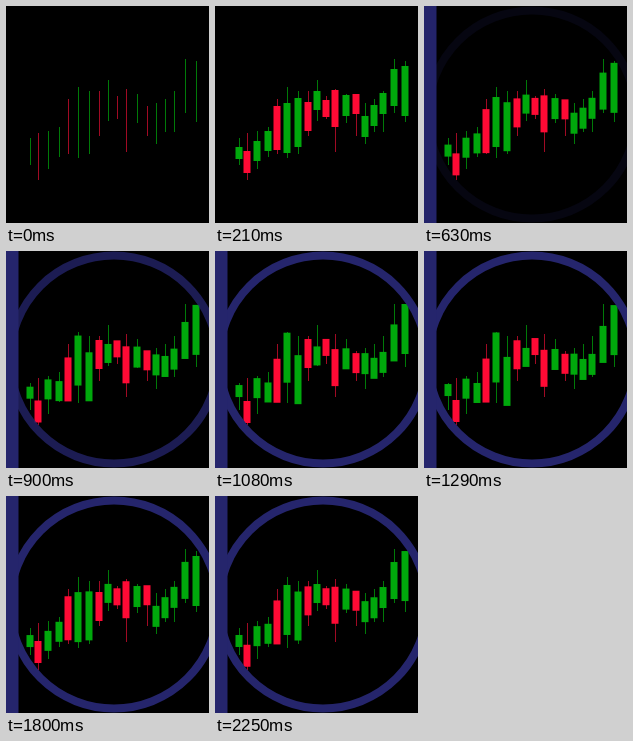
Recreate the animation shown at these times as an HTML page with a canvas. Size 203x217 px, loop 2280 ms.

```html
<!DOCTYPE html>
<html lang="en">
<head>
<meta charset="utf-8">
<title>Candles</title>
<style>
html, body { margin: 0; width: 100%; height: 100%; overflow: hidden; background: #000; }
canvas { display: block; width: 203px; height: 217px; }
</style>
</head>
<body>
<canvas id="stage" width="203" height="217"></canvas>
<script>
const LOOP = 2280, BLUE = '#25256c';
const ctx = document.getElementById('stage').getContext('2d');

// x, wick top, wick bottom, body top, body height, sway, lag
const candles = [
  [24, 132, 159, 141, 12, -8, 1],
  [32, 127, 174, 145, 22, 5, 0],
  [42, 125, 163, 135, 20, -8, .3],
  [53, 121, 151, 125, 20, 7, .7],
  [62, 93, 148, 100, 44, 8, .4],
  [72, 81, 152, 97, 50, -16, .5],
  [83, 85, 148, 92, 49, 14, 1],
  [93, 85, 130, 96, 29, -8, .1],
  [102, 74, 115, 85, 19, 12, 1],
  [111, 90, 113, 94, 17, -7, 1],
  [120, 83, 146, 84, 37, 15, .6],
  [131, 88, 117, 89, 21, 9, .7],
  [141, 100, 130, 88, 20, 15, .6],
  [150, 97, 138, 110, 21, -8, .3],
  [159, 93, 126, 99, 21, 9, 1],
  [168, 85, 126, 87, 21, 16, 1],
  [179, 53, 107, 63, 37, 12, 1],
  [190, 55, 116, 60, 50, -7, .1]
];
const tones = 'grggrggrgrrgrggggg';
const bodyColor = { g: '#00a80c', r: '#ff0a35' };
const wickColor = { g: '#007a08', r: '#a00a24' };

const ramp = (t, a, b) => Math.min(1, Math.max(0, (t - a) / (b - a)));
const ease = (t, a, b) => (1 - Math.cos(Math.PI * ramp(t, a, b))) / 2;

// Rise to a peak, fall to a valley, then start rising again.
function swing(t, lag) {
  const peak = 1080 + 270 * lag, valley = 1790 + 230 * lag;
  return ease(t, 210, peak) - ease(t, peak, valley) + ease(t, valley, valley + 690);
}

function draw(t) {
  ctx.globalAlpha = 1;
  ctx.fillStyle = '#000';
  ctx.fillRect(0, 0, 203, 217);

  const grow = ramp(t, 15, 200);
  candles.forEach(([x, high, low, top, height, sway, lag], i) => {
    ctx.fillStyle = wickColor[tones[i]];
    ctx.fillRect(x, high, 1, low - high);
    const h = height * grow;
    const y = top + sway * swing(t, lag) + (height - h) / 2;
    ctx.fillStyle = bodyColor[tones[i]];
    ctx.fillRect(x - 3.5, y, 7, h);
  });

  ctx.globalAlpha = ramp(t, 560, 1000);
  ctx.strokeStyle = BLUE;
  ctx.lineWidth = 8;
  ctx.beginPath();
  ctx.arc(108, 108.5, 104, 0, 2 * Math.PI);
  ctx.stroke();

  ctx.globalAlpha = ramp(t, 300, 640);
  ctx.fillStyle = BLUE;
  ctx.fillRect(0, 0, 12.5, 217);
}

const start = performance.now();
function tick() {
  draw((performance.now() - start) % LOOP);
  requestAnimationFrame(tick);
}
draw(0);
requestAnimationFrame(tick);
</script>
</body>
</html>
```
